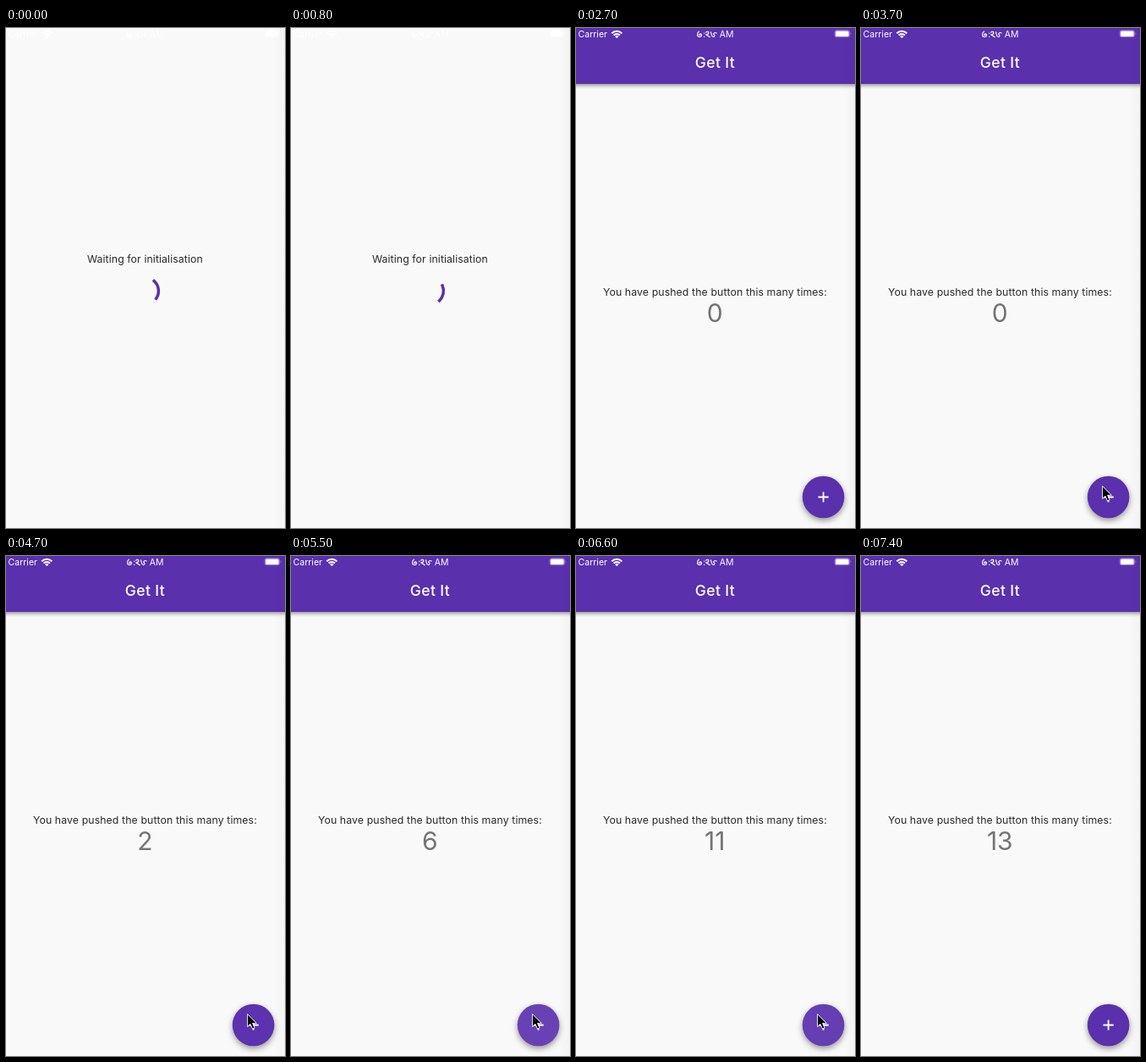
These frames come from a looping animation (330x590 px, 7500 ms). An HTML page:

```html
<!DOCTYPE html>
<html lang="en">
<head>
<meta charset="utf-8">
<title>Get It</title>
<style>
  html, body { margin: 0; width: 330px; height: 590px; overflow: hidden; background: #f9f9f9; }
  svg { display: block; font-family: Inter, Roboto, "Open Sans", sans-serif; }
  .mid { text-anchor: middle; }
  .body { font-size: 12.3px; letter-spacing: .1px; fill: #2b2b2b; }
  .title { font-size: 17.6px; font-weight: 500; letter-spacing: .35px; fill: #fff; }
  .count { font-size: 30px; fill: #747474; }
  .status { font-size: 10.5px; fill: #fff; }
  .line { fill: none; stroke: #fff; stroke-linecap: round; stroke-linejoin: round; }
  .bar { fill: #5a30ad; filter: drop-shadow(0 2px 2px rgba(0, 0, 0, .4)); }
  .fab { fill: #5a30ad; filter: drop-shadow(0 3px 3.5px rgba(0, 0, 0, .4)); }
</style>
</head>
<body>
<svg width="330" height="590" viewBox="0 0 330 590">
  <defs>
    <linearGradient id="edge">
      <stop offset="0" stop-opacity="0"/>
      <stop offset="1" stop-opacity=".025"/>
    </linearGradient>
  </defs>
  <rect width="330" height="590" fill="#f9f9f9"/>

  <g id="loading">
    <text class="mid body" x="164.4" y="276.7">Waiting for initialisation</text>
    <path id="arc" fill="none" stroke="#5a30ad" stroke-width="3.5" stroke-linecap="square"/>
  </g>

  <g id="home" visibility="hidden">
    <rect class="bar" x="-6" y="-6" width="342" height="72"/>
    <text class="mid title" x="164.4" y="47.2">Get It</text>
    <text class="mid body" x="164.4" y="315.5">You have pushed the button this many times:</text>
    <text class="mid count" id="count" x="164.3" y="347.1">0</text>
    <circle class="fab" cx="292.6" cy="553.5" r="24.8"/>
    <circle id="ink" cx="292.6" cy="553.5" r="24.8" fill="#fff" opacity="0"/>
    <path d="M286.5 553.5h12.2M292.6 547.4v12.2" stroke="#fff" stroke-width="1.8"/>
    <path id="pointer" d="M0 0V15L3.4 11.8L5.9 17.5L8.5 16.4L6 10.8H10.7Z"
      fill="#000" stroke="#fff" stroke-width=".9" stroke-linejoin="round"/>
  </g>

  <g class="status">
    <text x="2.6" y="10.9">Carrier</text>
    <path class="line" stroke-width="2" style="stroke-linecap: butt"
      d="M42.3 6.2a8.3 8.3 0 0 1 12 0M44.6 8.5a5.2 5.2 0 0 1 7.4 0"/>
    <path d="M48.3 12.1L46.1 9.9a3 3 0 0 1 4.400 0Z"/>
    <!-- Bengali digits of the clock -->
    <g class="line" stroke-width="1.15" role="img" aria-label="৬:২৮">
      <path d="M145.600 4C143 5.500 142.800 10.500 146 10.500C149.200 10.500 149.300 6.800 147 6.800C145.400 6.800 145.600 8.700 146.800 8.500"/>
      <path d="M153.800 5.300C154.300 3.800 157 3.900 156.900 5.700C156.800 7.300 155 7.700 153.700 7.700L158.300 10.700"/>
      <path d="M159.600 4.800C160 8 160.800 10.500 162.600 10.500C164.400 10.400 164.200 7.500 162.800 7.600C162.400 5.600 164.600 5 166.200 6"/>
    </g>
    <text x="150.200" y="10.900">:</text>
    <text x="169.800" y="10.900">AM</text>
    <rect x="306" y="2.800" width="17.600" height="7.900" rx="2.300" fill="none" stroke="#fff" stroke-width=".8" stroke-opacity=".45"/>
    <rect x="306.900" y="3.600" width="15.800" height="6.300" rx="1.500"/>
    <path d="M324.700 5.300q1.500 1.400 0 2.900Z" fill-opacity=".5"/>
  </g>
  <rect x="316" width="14" height="590" fill="url(#edge)"/>
</svg>

<script>
const LOOP = 7500, STEP = 100, HOME_AT = 2700;
const TAP_START = 4300, FIRST_COUNT = 4500, TAP_GAP = 200, TAPS = 13;
const $ = id => document.getElementById(id);
const clamp = (v, lo = 0, hi = 1) => Math.min(hi, Math.max(lo, v));

// cubic-bezier(.4, 0, .2, 1), solved by bisection
function ease(x) {
  let lo = 0, hi = 1, s = x;
  for (let i = 0; i < 24; i++) {
    s = (lo + hi) / 2;
    const at = 1.2 * (1 - s) ** 2 * s + 0.6 * (1 - s) * s * s + s ** 3;
    if (at < x) lo = s; else hi = s;
  }
  return s * s * (3 - 2 * s);
}

function arcPath(start, sweep) {
  const r = 15.9, cx = 164.5, cy = 310.3;
  const at = deg => {
    const a = deg * Math.PI / 180;
    return `${cx + r * Math.cos(a)} ${cy + r * Math.sin(a)}`;
  };
  return `M${at(start)}A${r} ${r} 0 ${sweep > 180 ? 1 : 0} 1 ${at(start + sweep)}`;
}

// Material indeterminate spinner: head and tail chase while the whole turns
function drawSpinner(t) {
  const age = Math.min(t, 2500) + 184;
  const phase = age / 1333 % 1;
  const head = ease(clamp(phase * 2));
  const tail = ease(clamp(phase * 2 - 1));
  const start = -90 + tail * 270 + age / 2222 * 360 + phase * 90;
  $("arc").setAttribute("d", arcPath(start, Math.max((head - tail) * 270, 0.1)));
}

// time, x, y of the pointer tip
const route = [
  [3200, 303, 560], [3300, 296, 551], [3400, 286, 539], [3500, 280, 533],
  [3600, 283, 537], [3700, 285.6, 540.5], [6900, 285.6, 540.5],
  [7000, 294, 550], [7100, 304, 563]
];

function drawPointer(t) {
  const shown = t >= 3200 && t < 7200;
  $("pointer").setAttribute("opacity", shown ? 1 : 0);
  if (!shown) return;
  const i = route.findLastIndex(p => p[0] <= t);
  const a = route[i], b = route[i + 1] || a;
  const k = b === a ? 0 : (t - a[0]) / (b[0] - a[0]);
  const x = a[1] + (b[1] - a[1]) * k, y = a[2] + (b[2] - a[2]) * k;
  $("pointer").setAttribute("transform", `translate(${x} ${y})`);
}

function drawTaps(t) {
  const taps = Math.floor((t - FIRST_COUNT) / TAP_GAP) + 1;
  $("count").textContent = clamp(taps, 0, TAPS);
  // overlapping ripples build up, then fade after the last tap
  const build = clamp((t - 4600) / 800);
  const fade = t < 7400 ? clamp((7600 - t) / 700) : 0;
  const pulse = (t - TAP_START) % TAP_GAP < STEP ? 0.085 : 0.065;
  $("ink").setAttribute("opacity", build * fade * pulse);
}

const begin = performance.now();
function frame() {
  const now = (performance.now() - begin) % LOOP;
  const t = Math.floor(now / STEP) * STEP;
  const home = t >= HOME_AT;
  $("loading").setAttribute("visibility", home ? "hidden" : "visible");
  $("home").setAttribute("visibility", home ? "visible" : "hidden");
  if (home) {
    drawTaps(t);
    drawPointer(t);
  } else {
    drawSpinner(t);
  }
  requestAnimationFrame(frame);
}
frame();
</script>
</body>
</html>
```
